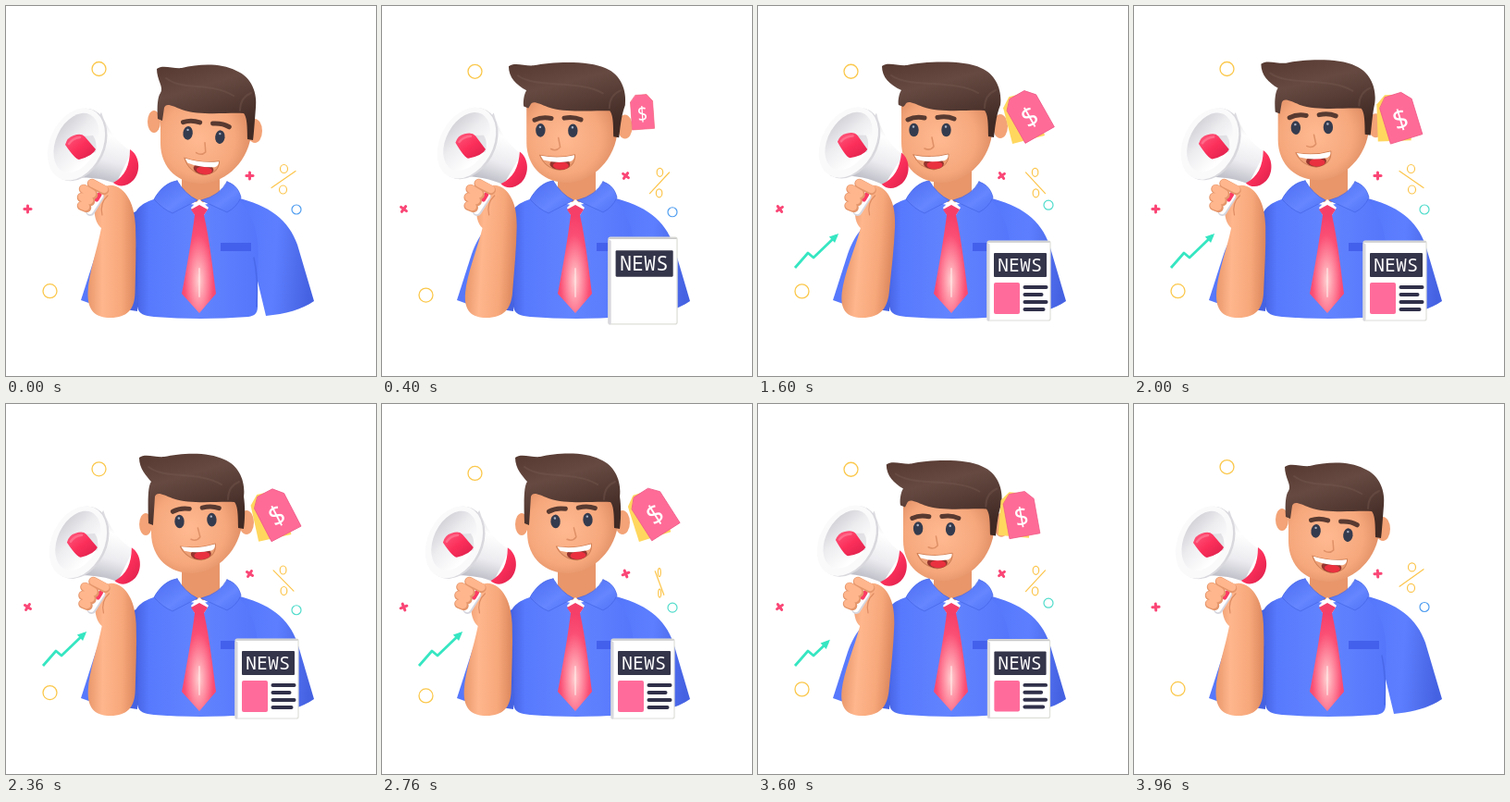
An HTML page for the animation above (4 s loop, 400 by 400 pixels).

```html
<!DOCTYPE html>
<html>
<head>
<meta charset="utf-8">
<title>News announcer</title>
<style>
  html, body { margin: 0; width: 100%; height: 100%; overflow: hidden; background: #fff; }
  svg { display: block; width: 100vw; height: 100vh; }
  text { font-family: "Noto Sans Mono", monospace; font-weight: 200; fill: #fff; text-anchor: middle; }
</style>
</head>
<body>
<svg viewBox="0 0 400 400" fill="none" stroke-linecap="round" stroke-linejoin="round">
  <defs>
    <radialGradient id="skin" cx=".42" cy=".5" r=".62">
      <stop stop-color="#ffb991"/><stop offset=".65" stop-color="#f6a87c"/><stop offset="1" stop-color="#dc8960"/>
    </radialGradient>
    <linearGradient id="armSkin">
      <stop stop-color="#e9976b"/><stop offset=".3" stop-color="#ffb68c"/><stop offset=".7" stop-color="#f7a87b"/><stop offset="1" stop-color="#dc875d"/>
    </linearGradient>
    <linearGradient id="hairFill" x2=".4" y2="1">
      <stop stop-color="#553830"/><stop offset=".4" stop-color="#664a42"/><stop offset="1" stop-color="#412a24"/>
    </linearGradient>
    <linearGradient id="shirt" gradientUnits="userSpaceOnUse" x1="138" x2="276">
      <stop stop-color="#4460df"/><stop offset=".12" stop-color="#5779fd"/><stop offset=".5" stop-color="#6384ff"/><stop offset="1" stop-color="#5475fa"/>
    </linearGradient>
    <linearGradient id="sleeve" x2="1" y2=".1">
      <stop stop-color="#5475fa"/><stop offset=".55" stop-color="#5d7fff"/><stop offset="1" stop-color="#4562e2"/>
    </linearGradient>
    <linearGradient id="collar" y2="1">
      <stop stop-color="#4c6cf2"/><stop offset=".6" stop-color="#6586ff"/><stop offset="1" stop-color="#4f70f6"/>
    </linearGradient>
    <radialGradient id="tie" cx=".5" cy=".7" r=".6">
      <stop stop-color="#ffd0d0"/><stop offset=".3" stop-color="#ff97a8"/><stop offset=".7" stop-color="#fb4f75"/><stop offset="1" stop-color="#f53f69"/>
    </radialGradient>
    <linearGradient id="cone" x1=".7" y1="0" x2=".45" y2="1">
      <stop stop-color="#d2d2d8"/><stop offset=".3" stop-color="#fff"/><stop offset=".65" stop-color="#ececf0"/><stop offset="1" stop-color="#b4b4bf"/>
    </linearGradient>
    <linearGradient id="bowl" x2="1" y2=".5">
      <stop stop-color="#c9c9cf"/><stop offset=".5" stop-color="#ededf0"/><stop offset="1" stop-color="#fff"/>
    </linearGradient>
    <linearGradient id="red" x2="1" y2="1">
      <stop stop-color="#ff5d80"/><stop offset=".5" stop-color="#fb2f5a"/><stop offset="1" stop-color="#d91f4a"/>
    </linearGradient>
    <path id="tagShape" d="M-9 0H9L18 10V50H-18V10Z"/>
    <path id="plus" d="M-3.6 0H3.6M0-3.6V3.6" stroke="#fa4676" stroke-width="3"/>
    <ellipse id="eye" rx="5.2" ry="7.3" fill="#343b4e"/>
  </defs>

  <!-- neck and shirt -->
  <path d="M190 165H231V205L209 214 190 203Z" fill="#e8966a"/>
  <path d="M141 222C118 230 105 245 97 268L81 318 95 323 142 330Z" fill="url(#sleeve)"/>
  <path d="M248 207C285 215 306 232 315 258L333 319C320 328 302 333 281 335L269 285Z" fill="url(#sleeve)"/>
  <path d="M166 207C148 212 140 218 138 230L142 325C143 333 150 335 160 336Q209 340 262 336C269 335 272 332 272 325V290C273 265 276 232 249 207L209 216Z" fill="url(#shirt)"/>
  <path d="M271 325Q273 295 268 272M142 325Q141 290 141 262" stroke="#3f5cda" stroke-width="1.5" opacity=".5"/>
  <rect x="232" y="256" width="33" height="9" fill="#4360ec"/>
  <path d="M200 218L209 209 219 218 214 226H204Z" fill="#fff"/>
  <path d="M200 220L209 215 218 220 214 226C220 252 224 288 227 311L209 332 190 311C196 280 201 250 204 226Z" fill="url(#tie)"/>
  <path d="M209 284V314" stroke="#ffe8e6" stroke-width="2" opacity=".6"/>
  <path d="M185 189C175 190 166 198 160 209Q170 220 180 224L207 210Q194 204 185 189Z" fill="url(#collar)" stroke="#4767e8" stroke-width=".8"/>
  <path d="M239 190C248 193 252 199 254 207Q249 218 239 223L211 210Q231 205 239 190Z" fill="url(#collar)" stroke="#4767e8" stroke-width=".8"/>

  <!-- head -->
  <ellipse id="earL" rx="7" ry="12" fill="#f3a377"/>
  <ellipse id="earR" rx="8" ry="13" fill="#f3a377"/>
  <path id="face" d="M167 95V148C167 177 188 192 211 192 233 192 260 173 265 140V95Z" fill="url(#skin)"/>
  <g id="features">
    <path d="M-24-11Q-16-15-6-13M8-13.5Q18-15.5 26-12" stroke="#583a31" stroke-width="5"/>
    <use href="#eye" x="-17.5"/><use href="#eye" x="17.5"/>
    <path d="M-18-3.5h.1M17-3.5h.1" stroke="#a8b1c4" stroke-width="2.4"/>
    <path d="M2 8L4 18Q0 23-6 20" stroke="#df9066" stroke-width="1.5"/>
    <path d="M-18 27Q2 31 20 26 21 40 4 43-12 41-18 27Z" fill="#ee9f75" stroke="#d08056"/>
    <ellipse cx="4" cy="36.5" rx="11" ry="6" fill="#96352f"/>
    <ellipse cx="5" cy="38" rx="8.5" ry="4.2" fill="#e93140"/>
    <path d="M-17 27.5Q2 31 19.5 26.5 20 31 16 33 0 36-14 32Z" fill="#fff"/>
  </g>
  <path id="hair" fill="url(#hairFill)"/>
  <path id="shine" stroke="#765a51" stroke-width="2" opacity=".4"/>

  <!-- arm and megaphone -->
  <g id="horn">
    <path d="M103 115C109 133 121 149 136 157L119 192C102 185 82 184 60 187Z" fill="url(#cone)"/>
    <path d="M134 155C145 162 146 179 138 188 130 196 122 196 116 191 129 184 134 172 134 155Z" fill="url(#red)"/>
    <ellipse cx="78" cy="150" rx="29" ry="41" transform="rotate(25 78 150)" fill="#d8d8dd"/>
    <ellipse cx="76" cy="149.5" rx="28.5" ry="41" transform="rotate(25 76 149.5)" fill="#fafafb"/>
    <ellipse cx="76" cy="148" rx="22" ry="34" transform="rotate(25 76 148)" fill="url(#bowl)"/>
    <path d="M82 141Q88 160 97 158 99 147 94 140Z" fill="#c4c4cb" opacity=".4"/>
    <path d="M64 150Q66 142 73 140 81 137 85 141L97 155Q94 162 79 166 75 166 64 150Z" fill="url(#red)"/>
    <path d="M68 149Q72 143 80 142" stroke="#ff7a95" stroke-width="2.5" opacity=".7"/>
  </g>
  <path id="arm" d="M103 240C99 262 89 290 88.5 310 88 330 97 337 113 337 131 337 139 328 139.5 310 140 285 141 262 140 238 139 215 131 200 119 195 107 190 98 200 96 213 94 226 98 236 103 240Z" fill="url(#armSkin)"/>
  <g id="hand">
    <path d="M101 206L91 222" stroke="#d5d5de" stroke-width="10"/>
    <path d="M101 205L90.5 221" stroke="#fff" stroke-width="8"/>
    <path d="M101 204L98 209" stroke="#fb3a63" stroke-width="5"/>
    <g stroke="#e5966b" stroke-width="10.5">
      <path d="M93 192L106 199M84 198L94 204M82 207L91 211M82 216L87 218"/>
      <path d="M93 191.5L106 198M84 197.5L93 203M82 206.5L90 210M82 215.5L86 217" stroke="#ffb68d" stroke-width="8.5"/>
    </g>
    <path d="M104 226Q101 213 110 205" stroke="#de8c63" stroke-width="1.2"/>
  </g>
  <path id="rays" d="M91 118L101 131M79 130L91 140M73 152L91 153" pathLength="3" stroke="#ffb336" stroke-width="5.5" stroke-linecap="butt"/>

  <!-- price tag -->
  <g id="tag">
    <use id="backTag" href="#tagShape" fill="#ffd75e"/>
    <use href="#tagShape" fill="#ff6b97" stroke="#ef5c88" stroke-width=".8"/>
    <text y="38" font-size="29">$</text>
  </g>

  <!-- newspaper -->
  <g id="paper">
    <rect x="-34" y="-43" width="68" height="86" rx="2" fill="#fff" stroke="#deded9" stroke-width="1.2"/>
    <path d="M-33-42H33" stroke="#c9c9ca" stroke-width="1.5"/>
    <path d="M-33 42V-39" stroke="#d8d8de" stroke-width="3"/>
    <rect x="-27" y="-30" width="57" height="26" rx="1" fill="#34344a"/>
    <text x="1" y="-10" font-size="20">NEWS</text>
    <rect id="photo" x="-27" y="2" height="34" rx="2" fill="#ff6c9b"/>
    <g id="lines" stroke="#30304a" stroke-width="4"></g>
  </g>

  <!-- ornaments -->
  <path id="trend" d="M40 283L54 267 60 272 85 248" pathLength="1" stroke="#36e6c2" stroke-width="2.8" stroke-linecap="butt"/>
  <path id="tip" d="M-7-4.5L3 0-7 4.5Z" fill="#36e6c2"/>
  <circle id="ringA" cx="100.5" r="7.5" stroke="#fbc84c" stroke-width="1.3"/>
  <circle id="ringB" cx="47.5" r="7.5" stroke="#fbc84c" stroke-width="1.3"/>
  <circle id="ringC" cx="314" r="5" stroke-width="1.2"/>
  <use id="plusA" href="#plus"/>
  <use id="plusB" href="#plus"/>
  <g stroke="#fcc54b" stroke-width="1.2">
    <path id="slash"/>
    <ellipse id="dotA" ry="4.5"/>
    <ellipse id="dotB" ry="4.5"/>
  </g>
</svg>
<script>
const LOOP = 4000;
const $ = id => document.getElementById(id);
const set = (id, attrs) => { for (const k in attrs) $(id).setAttribute(k, attrs[k]); };
const place = (id, transform) => set(id, { transform });
const lerp = (a, b, u) => a + (b - a) * u;
const ramp = (t, from, to) => {
  const u = Math.min(1, Math.max(0, (t - from) / (to - from)));
  return u * u * (3 - 2 * u);
};
const track = (t, keys) => {
  const i = Math.max(1, keys.findIndex(k => k[0] >= t));
  const [a, b] = t > keys.at(-1)[0] ? [keys.at(-1), keys.at(-1)] : [keys[i - 1], keys[i]];
  return lerp(a[1], b[1], a === b ? 1 : ramp(t, a[0], b[0]));
};

// hair left, right, y, left sideburn end; face x, y; left ear x, y; right ear x, y; eyes x, y; tilt
const rest = [163, 271, 0, 124, 0, 0, 160, 125, 269, 135, 214, 139.5, 7];
const shout = [134, 263, -3, 112, -12, -1, 172, 128, 262, 130, 186, 134, 0];
const front = [144, 258, -10, 141, -10, -9, 151, 130, 260, 128, 205, 126, -3];

const lineWidths = [23, 18, 23, 20];
$('lines').innerHTML = lineWidths.map((w, i) => `<path id="line${i}"/>`).join('');

function drawHead(t) {
  const left = ramp(t, 0, 500) - ramp(t, 3480, 3950);
  const ahead = ramp(t, 1760, 2380) - ramp(t, 2770, 3150);
  const [a, c, hy, burn, fx, fy, lx, ly, rx, ry, ex, ey, tilt] =
    rest.map((v, i) => lerp(lerp(v, shout[i], left), front[i], ahead));
  const b = 166 + fx, d = 267 + fx;
  place('face', `translate(${fx} ${fy})`);
  place('features', `translate(${ex} ${ey}) rotate(${tilt})`);
  set('earL', { cx: lx, cy: ly });
  set('earR', { cx: rx, cy: ry });
  set('hair', {
    transform: `translate(0 ${hy})`,
    d: `M${a} 68C${a + 6} 63 ${a + 18} 68 ${a + 27} 67C${a + 45} 63 ${c - 40} 61 ${c - 22} 70
      C${c - 5} 77 ${c + 1} 95 ${c - 1} 110C${d + 2} 122 ${d + 1} 138 ${d} 145L${d - 6} 144
      C${d - 6} 126 ${d - 7} 120 ${d - 10} 116C${d - 30} 115 ${b + 45} 119 ${b + 24} 112
      C${b + 14} 108 ${b + 7} 104 ${b + 5} 110L${b + 3} ${burn} ${b - 2} ${burn - 2}C${b - 3} 108 ${b - 2} 98 ${b + 1} 94
      C${a + 8} 88 ${a} 80 ${a} 68Z`
  });
  set('shine', {
    transform: `translate(0 ${hy})`,
    d: `M${a + 10} 78C${a + 28} 92 ${c - 50} 82 ${c - 25} 97M${c - 18} 113Q${c - 18} 99 ${c - 6} 94`
  });
}

function drawArm(t) {
  const k = track(t, [[0, 0], [400, .65], [700, 1], [1500, 1], [2000, .25], [2300, .08],
    [2760, .08], [3140, 1], [3480, 1], [3950, 0]]);
  const skew = -Math.atan(11 * k / 124) * 180 / Math.PI;
  place('arm', `translate(0 337) skewX(${skew}) translate(0 -337)`);
  place('hand', `translate(${18 * k})`);
  place('horn', `translate(${17 * k}) rotate(${6 * k} 100 213)`);
  const ray = ramp(t, 820, 1040) - ramp(t, 1350, 1550);
  place('rays', `translate(${24 * (k - 1)})`);
  set('rays', { visibility: ray > .02 ? 'visible' : 'hidden', 'stroke-dasharray': `${ray} ${1 - ray}` });
}

function drawProps(t) {
  const size = track(t, [[100, 0], [390, 1.09], [600, 1], [3580, 1], [3880, 0]]);
  place('paper', `translate(282 297) scale(${size})`);
  set('photo', { width: 28 * ramp(t, 580, 860) });
  lineWidths.forEach((w, i) => {
    const u = ramp(t, 845 + 95 * i, 1025 + 95 * i);
    set('line' + i, { d: u ? `M6.5 ${7 + 8 * i}h${w * u}` : '' });
  });

  const grow = ramp(t, 200, 500) - ramp(t, 3560, 3860);
  const swing = track(t, [[300, 0], [400, -4], [1000, -31], [1500, -31], [2000, -17], [2600, -33], [3160, -31], [3800, -4]]);
  place('tag', `translate(280 96) rotate(${swing}) scale(${grow * lerp(.6, 1, grow)} ${grow})`);
  place('backTag', `rotate(${15 * ramp(t, 450, 900)})`);

  const drawn = ramp(t, 700, 1250) - ramp(t, 3500, 3850);
  const trend = $('trend'), length = trend.getTotalLength();
  const end = trend.getPointAtLength(length * drawn), prev = trend.getPointAtLength(length * drawn - 1);
  const angle = Math.atan2(end.y - prev.y, end.x - prev.x) * 180 / Math.PI;
  const visibility = drawn > .01 ? 'visible' : 'hidden';
  set('trend', { visibility, 'stroke-dasharray': `${drawn} 2` });
  set('tip', { visibility, transform: `translate(${end.x} ${end.y}) rotate(${angle})` });
}

function drawOrnaments(t) {
  const turn = t / LOOP * 2 * Math.PI;
  const c = Math.cos(2 * turn), s = Math.sin(2 * turn);
  set('ringA', { cy: 72 - 4 * c });
  set('ringB', { cy: 311.5 - 3.3 * c + 2.2 * s });
  set('ringC', { cy: 218.5 + 1.5 * c + 4 * s, stroke: t > 600 && t < 3700 ? '#4fdccb' : '#4f9df0' });
  place('plusA', `translate(263.5 183.5) rotate(${t * .09})`);
  place('plusB', `translate(23.5 219.5) rotate(${t * .09})`);

  const x = Math.cos(turn), depth = Math.abs(Math.sin(turn));
  const y = 187.5 + 6.5 * depth, h = 9 + 4 * depth;
  set('slash', { d: `M${300 - 13 * x} ${y + h}L${300 + 13 * x} ${y - h}` });
  const dot = { rx: Math.max(1, 4 * Math.abs(x)) };
  set('dotA', { ...dot, cx: 300 + x / 2, cy: y - 11.5 });
  set('dotB', { ...dot, cx: 300 - x / 2, cy: y + 11 });
}

function frame(now) {
  const t = now % LOOP;
  drawHead(t);
  drawArm(t);
  drawProps(t);
  drawOrnaments(t);
  requestAnimationFrame(frame);
}
frame(performance.now());
</script>
</body>
</html>
```
